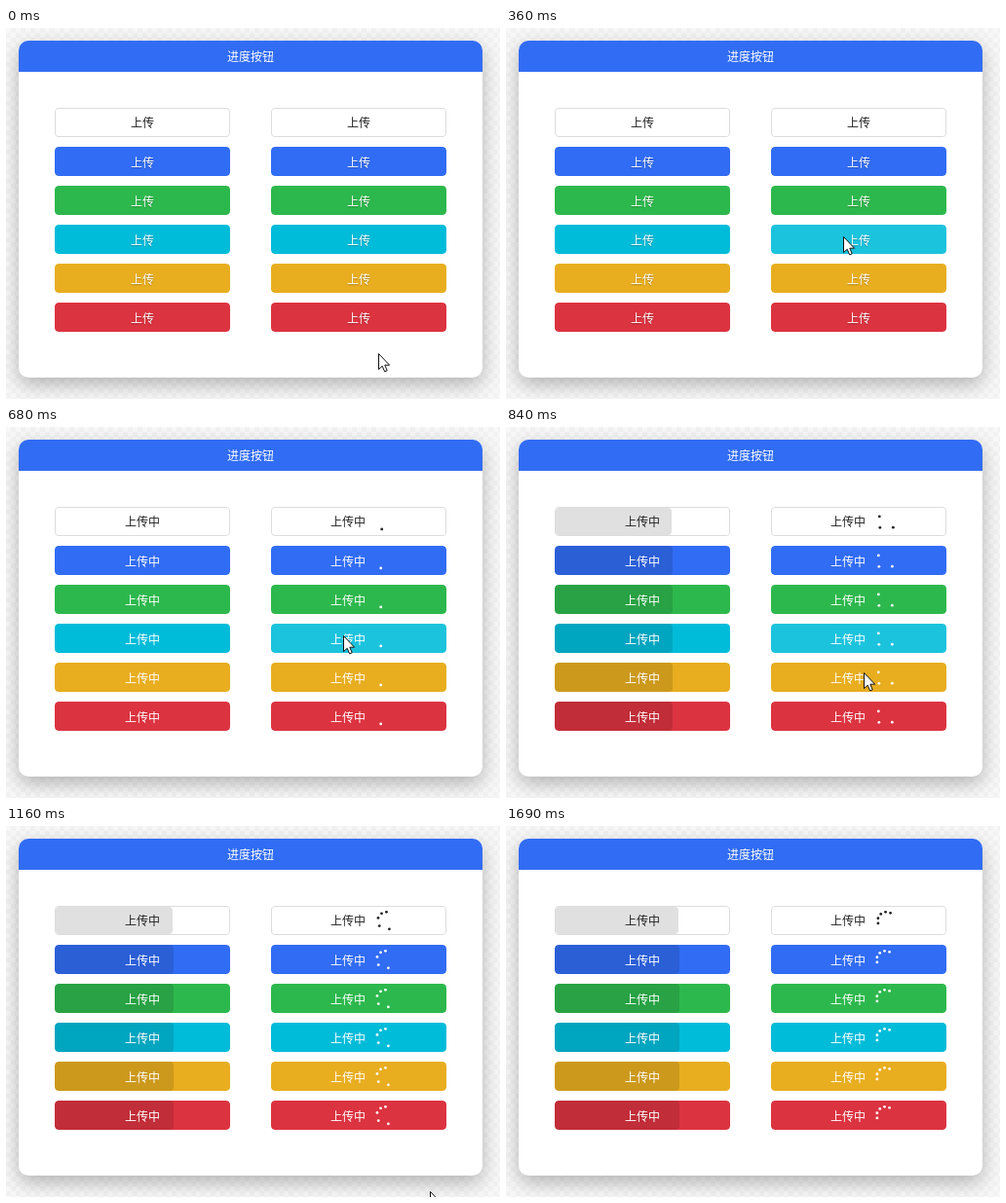
Recreate the animation shown at these times as an HTML page. Size 507 px wide and 381 px high, loop 1770 ms.

```html
<!DOCTYPE html>
<html lang="zh-CN">
<head>
<meta charset="utf-8">
<title>进度按钮</title>
<style>
html, body { margin: 0; width: 100%; height: 100%; overflow: hidden; }
body {
  position: relative;
  background: repeating-conic-gradient(#f2f2f2 0 25%, #f8f8f8 0 50%) 0 0 / 10px 10px;
  font: 500 12px/30px "Noto Sans CJK SC", "Noto Sans CJK", sans-serif;
}
.card {
  position: absolute; left: 13px; top: 13px; width: 476px; height: 346px;
  border-radius: 10px; background: #fff; box-shadow: 0 7px 20px rgba(0, 0, 0, .28);
}
.title {
  height: 32px; line-height: 31px; text-align: center; color: #fff;
  background: #316cf4; border-radius: 10px 10px 0 0;
}
.button {
  position: absolute; width: 180px; height: 30px; border-radius: 4px;
  overflow: hidden; box-sizing: border-box; color: #fff;
}
.button.plain { border: 1px solid #dcdcdc; color: #222; font-weight: 400; }
.fill { position: absolute; inset: 0; border-radius: inherit; }
.bar {
  position: absolute; left: 0; top: 0; bottom: 0; width: 0;
  border-radius: 4px; background: rgba(0, 0, 0, .12);
}
.label { position: absolute; top: 1px; left: 0; right: 0; text-align: center; white-space: nowrap; }
.colored .label { text-shadow: 0 1px 1px rgba(0, 0, 0, .25); }
.colored .label.busy { text-shadow: none; }
.plain .label { top: -1px; }
.label.busy.right { left: -22px; }
.overlay { position: absolute; left: 0; top: 0; overflow: visible; }
</style>
</head>
<body>
<div class="card"><div class="title">进度按钮</div></div>
<div id="buttons"></div>
<svg class="overlay" width="507" height="381">
  <g id="spinners"></g>
  <path id="cursor" d="M.5.5V16.6L4.2 13.2 6.7 18.9 9.2 17.8 6.8 12.2H11.6Z" fill="#fff" stroke="#111" stroke-linejoin="round"/>
  <circle id="press" cx="346" cy="214" r="12" fill="#ff0" fill-opacity=".5"/>
</svg>
<script>
const LOOP = 1770, TICK = 76, LAST = 22;
// Moments below are counted in ticks.
const PRESS = 8, LOADING = 9, SETTLED = 11, GONE = 16;
const COLORS = ['#fff', '#316cf4', '#2db84d', '#00bcd9', '#e8ae20', '#dc3340'];
const TOP = 82, PITCH = 40, HEIGHT = 30, DOTS = 5;

const byId = id => document.getElementById(id);
const clamp = x => Math.min(1, Math.max(0, x));
const mix = (a, b, u) => a + (b - a) * u;
const easeOut = (u, power) => 1 - (1 - u) ** power;
const show = (el, visible) => { el.style.display = visible ? '' : 'none'; };

// The approach runs slightly ahead of the beat.
function tickAt(ms) {
  const lead = ms < PRESS * TICK ? 22 : 4;
  return Math.min(LAST, Math.floor((ms + lead) / TICK));
}

function pointer(k) {
  const arrive = clamp(k / 5), leave = clamp((k - LOADING) / 6) ** 1.31;
  return {
    x: Math.round(mix(mix(382, 346, easeOut(arrive, 5)), 435, leave)),
    y: Math.round(mix(mix(334, 214, easeOut(arrive, 2.5)), 375, leave))
  };
}

// The pressed row stays lit until shortly after loading begins.
function hoveredRow(k) {
  if (k > SETTLED) return -1;
  const y = pointer(Math.min(k, PRESS)).y - TOP;
  return y % PITCH <= HEIGHT ? Math.floor(y / PITCH) : -1;
}

function progress(k) {
  const jump = easeOut(clamp((k - LOADING) / (SETTLED - LOADING)), 2);
  const trickle = clamp((k - SETTLED) / (LAST - SETTLED)) ** 2;
  return 67 * jump + 4 * trickle;
}

// Clockwise degrees from the top: a fast entry slowing to a steady crawl.
function dotAngle(i, k) {
  const lag = Math.max(0, 6.1 + 3 * i - 2.52 * (k - SETTLED));
  return 387 - 33.5 * i + 3.9 * (k - LAST) - lag ** 2;
}

function add(parent, className) {
  const el = document.createElement('div');
  el.className = className;
  return parent.appendChild(el);
}

function makeButton(row, right) {
  const el = add(byId('buttons'), 'button ' + (row ? 'colored' : 'plain'));
  el.style.left = (right ? 272 : 50) + 'px';
  el.style.top = TOP + row * PITCH + 'px';
  const fill = add(el, 'fill');
  fill.style.background = COLORS[row];
  return { row, right, fill, bar: add(el, 'bar'), label: add(el, 'label') };
}

function makeDot(row, index) {
  const el = document.createElementNS('http://www.w3.org/2000/svg', 'circle');
  el.setAttribute('r', 1.4);
  el.setAttribute('fill', row ? '#fff' : '#222');
  byId('spinners').append(el);
  return { el, index, x: row ? 389.5 : 390.5, y: TOP + 15.3 + row * PITCH };
}

const buttons = COLORS.flatMap((_, row) => [makeButton(row, false), makeButton(row, true)]);
const dots = COLORS.flatMap((_, row) => Array.from({ length: DOTS }, (_, i) => makeDot(row, i)));

function render(k) {
  const loading = k >= LOADING, pressed = k === PRESS, hovered = hoveredRow(k);
  for (const { row, right, fill, bar, label } of buttons) {
    label.textContent = loading ? '上传中' : '上传';
    label.classList.toggle('busy', loading);
    label.classList.toggle('right', right);
    if (right) fill.style.opacity = row !== hovered ? 1 : pressed ? .6 : .89;
    else bar.style.width = progress(k) + '%';
  }
  for (const { el, index, x, y } of dots) {
    const degrees = dotAngle(index, k), angle = degrees * Math.PI / 180;
    el.setAttribute('cx', x + 9 * Math.sin(angle));
    el.setAttribute('cy', y - 9 * Math.cos(angle));
    show(el, loading && degrees > 115);
  }
  const { x, y } = pointer(k);
  byId('cursor').setAttribute('transform', `translate(${x} ${y})`);
  show(byId('cursor'), k < GONE);
  show(byId('press'), pressed);
}

const start = performance.now();
function frame() {
  render(tickAt((performance.now() - start) % LOOP));
  requestAnimationFrame(frame);
}
frame();
</script>
</body>
</html>
```
